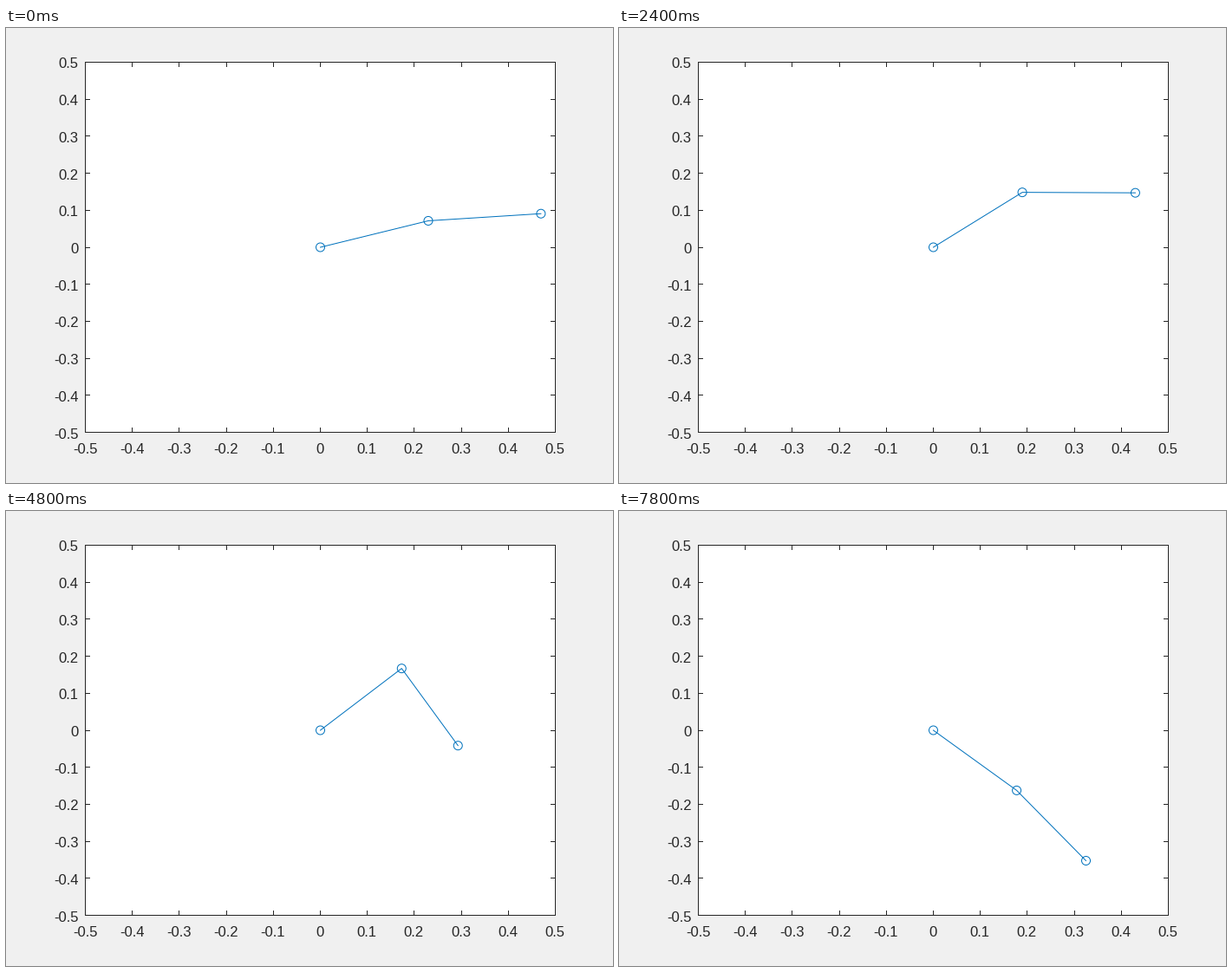
Write a matplotlib script that moves like this. It is 700 px wide and 525 px high and loops after 8000 ms.

```python
import numpy as np
import matplotlib.pyplot as plt
from matplotlib.animation import FuncAnimation
from matplotlib.patches import Circle, Rectangle

W, H, DPI = 700, 525, 100
PX = 72 / DPI
LEFT, RIGHT, TOP, BOTTOM = 91.5, 633.5, 39.5, 466.5
TICK = 5.5
INK, BLUE = "#262626", "#0072BD"
LINK = 0.2405
STEP_MS, FRAMES = 200, 40

# Directions of the two links in degrees, one key pose every POSE_MS
POSE_MS = 1200
POSES = np.array([(17.3, 4.6), (20.1, 4.6), (38.1, -0.3), (62.6, -22.2),
                  (44, -60.1), (-17.5, -85), (-51.8, -74.1), (-22.3, -24.1)])


def spline_slopes(p):
    """Slopes of the natural cubic spline through evenly spaced poses."""
    n = len(p)
    m = 4 * np.eye(n) + np.eye(n, k=1) + np.eye(n, k=-1)
    m[0, 0] = m[-1, -1] = 2
    q = np.pad(p, ((1, 1), (0, 0)), mode="edge")
    return np.linalg.solve(m, 3 * (q[2:] - q[:-2]))


SLOPES = spline_slopes(POSES)


def link_angles(ms):
    i, rest = divmod(ms, POSE_MS)
    u = rest / POSE_MS
    ease = u * u * (3 - 2 * u)
    bend = u * (1 - u) * (SLOPES[i] * (1 - u) - SLOPES[i + 1] * u)
    return np.radians(POSES[i] + (POSES[i + 1] - POSES[i]) * ease + bend)


def to_px(x, y):
    return LEFT + (x + 0.5) * (RIGHT - LEFT), BOTTOM - (y + 0.5) * (BOTTOM - TOP)


def joints(ms):
    a = link_angles(ms)
    x = np.append(0, np.cumsum(LINK * np.cos(a)))
    y = np.append(0, np.cumsum(LINK * np.sin(a)))
    return to_px(x, y)


fig = plt.figure(figsize=(W / DPI, H / DPI), dpi=DPI, facecolor="#F0F0F0")
ax = fig.add_axes([0, 0, 1, 1])
ax.set_xlim(0, W)
ax.set_ylim(H, 0)
ax.axis("off")


def stroke(x, y):
    ax.plot(x, y, color=INK, lw=PX, solid_capstyle="butt", snap=False, zorder=2)


def label(x, y, text, ha):
    ax.text(x, y, text, ha=ha, va="baseline", color=INK,
            family="Liberation Sans", fontsize=12)


def pixel_center(v):
    return np.floor(v + 1e-6) + 0.5


ax.add_patch(Rectangle((LEFT, TOP), RIGHT - LEFT, BOTTOM - TOP, fc="white",
                       ec=INK, lw=PX, joinstyle="miter", snap=False, zorder=1))

for k in range(-5, 6):
    x, y = to_px(k / 10, k / 10)
    text = f"{k / 10:.1f}" if k else "0"
    tx, ty = pixel_center(x), pixel_center(y)
    stroke([tx, tx], [TOP, TOP + TICK])
    stroke([tx, tx], [BOTTOM, BOTTOM - TICK])
    stroke([LEFT, LEFT + TICK], [ty, ty])
    stroke([RIGHT, RIGHT - TICK], [ty, ty])
    label(x - 0.5, 491, text, "center")
    label(83.5, y + 7, text, "right")

arm, = ax.plot([], [], color=BLUE, lw=PX, snap=False, zorder=3)
rings = [ax.add_patch(Circle((0, 0), 5, fill=False, ec=BLUE, lw=PX, zorder=3))
         for _ in range(3)]


def draw(n):
    xs, ys = joints(n * STEP_MS)
    arm.set_data(xs, ys)
    for ring, x, y in zip(rings, xs, ys):
        ring.center = x, y
    return [arm, *rings]


anim = FuncAnimation(fig, draw, frames=FRAMES, interval=STEP_MS,
                     repeat=True, repeat_delay=0)
plt.show()
```
